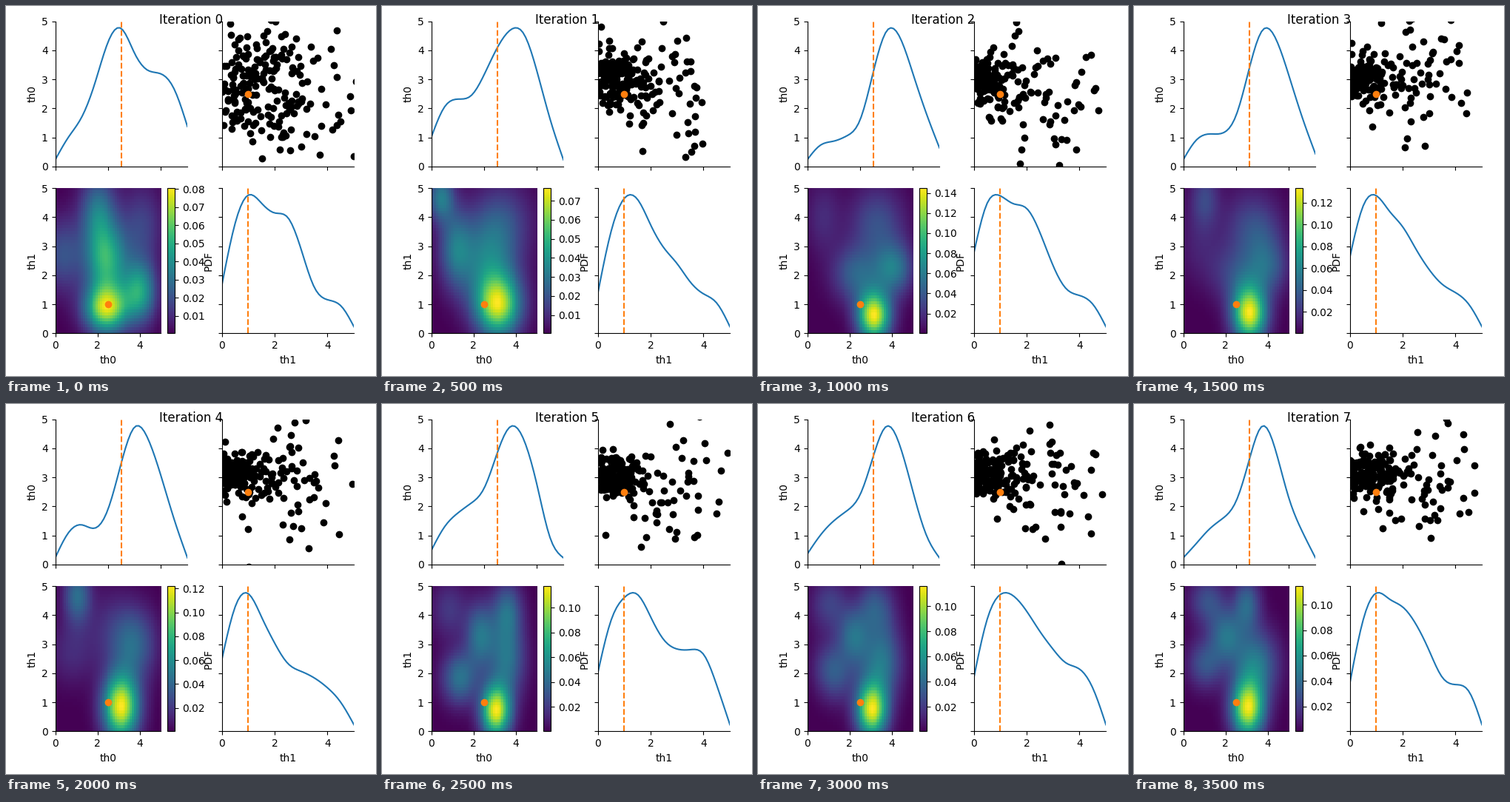
Animation, 500 px wide and 500 px high, one loop 4000 ms. Source, as a matplotlib script:

```python
import numpy as np
import matplotlib.pyplot as plt
from matplotlib.animation import FuncAnimation
from matplotlib.ticker import MultipleLocator

SIZE, DPI = 500, 100
COL, ROW = (66.5, 291.5), (20.6, 246.1)   # left and top edges of the panels
W, H = 178.7, 196.2
TRUTH = (2.5, 1.0)                        # th0, th1


def step(top, pdf0, pdf1, blobs, groups):
    """pdf0, pdf1: relative density at 0, 0.5 ... 5
    blobs: x, y, spread x, spread y, weight of the joint density
    groups: count, th1, th0, spread th1, spread th0 of the samples"""
    return dict(top=top, pdf0=np.array(pdf0), pdf1=np.array(pdf1),
                blobs=np.array(blobs), groups=np.array(groups))


def between(a, b):
    """A step halfway between two others."""
    mid = {k: (a[k] + b[k]) / 2 for k in ("top", "pdf0", "pdf1")}
    mid["blobs"] = np.vstack([a["blobs"], b["blobs"]])
    mid["groups"] = np.vstack([a["groups"], b["groups"]])
    mid["groups"][:, 0] /= 2
    return mid


first = step(
    .0804,
    [0, .17, .32, .575, .885, .985, .80, .672, .645, .53, .25],
    [.31, .78, 1, .94, .865, .83, .59, .30, .205, .16, 0],
    [(2.4, .8, .72, .6, .85), (4, 1.4, .55, .75, .55),
     (2.4, 2.5, .7, .9, .6), (2, 4.2, .6, .9, .38),
     (4.1, 3.7, .7, 1, .2), (.3, 2.7, .7, .9, .25)],
    [(75, .8, 2.4, .55, .7), (45, 2.25, 2.2, .6, .8),
     (48, 1.6, 4, 1, .65), (45, 3.4, 2, 1, 1.5)])

second = step(
    .0766,
    [.17, .40, .46, .485, .645, .85, .985, .955, .67, .305, 0],
    [.25, .72, .975, .97, .775, .60, .48, .34, .25, .18, 0],
    [(3.15, .9, .75, .75, .85), (2.7, 2.5, 1, 1.1, .4),
     (.4, 4.7, .45, .6, .4), (1.1, 2.9, .55, .95, .34),
     (3.4, 4, 1, .9, .18)],
    [(125, .65, 3.1, .55, .6), (40, 1.7, 2.95, .7, .8),
     (45, 2.9, 2.2, .9, 1.4)])

third = step(
    .1448,
    [0, .11, .14, .18, .30, .66, .965, .92, .645, .35, .09],
    [.55, .925, .985, .925, .89, .71, .46, .285, .235, .17, 0],
    [(3.15, .55, .55, .6, .95), (4.1, 2.2, .65, .65, .38),
     (2.3, 2, .8, .7, .3), (3.3, 3.8, .9, .9, .24),
     (.7, 4, .6, .9, .12)],
    [(110, .4, 3.05, .37, .36), (55, 1.4, 3, .65, .75),
     (42, 2.8, 2.2, 1, 1.3)])

fifth = step(
    .122,
    [0, .19, .25, .225, .37, .72, .99, .905, .62, .29, 0],
    [.49, .89, .995, .82, .62, .465, .405, .355, .28, .17, 0],
    [(3.1, .8, .6, .8, .97), (3.7, 3, .75, .9, .33),
     (1, 4.7, .45, .7, .35), (.7, 2.7, .8, .8, .12),
     (2.5, 3.6, .8, 1, .1)],
    [(115, .48, 3.05, .36, .34), (45, 1.25, 3.2, .5, .6),
     (46, 2.9, 3, .85, 1.2)])

sixth = step(
    .1175,
    [.055, .235, .34, .415, .53, .80, 1, .90, .555, .15, 0],
    [.39, .79, .965, .99, .82, .645, .575, .57, .535, .30, 0],
    [(3.05, .65, .5, .65, .92), (3.6, 2.5, .6, .95, .36),
     (2.3, 3.3, .5, .8, .36), (1.3, 1.8, .6, .65, .36),
     (3.6, 4.2, .5, .7, .3), (.8, 4.2, .6, .7, .16)],
    [(110, .55, 3.03, .4, .34), (42, 1.3, 2.97, .55, .57),
     (46, 2.9, 2.6, 1, 1.2)])

eighth = step(
    .1146,
    [0, .11, .22, .30, .43, .745, 1, .81, .45, .20, 0],
    [.31, .79, 1, .955, .895, .765, .565, .36, .305, .255, 0],
    [(3.05, .72, .55, .7, .9), (3.4, 2.3, .75, .85, .4),
     (3, 4.4, .45, .65, .32), (2, 3.3, .55, .65, .33),
     (1, 2.3, .6, .6, .26), (1.1, 4.5, .6, .6, .24)],
    [(105, .7, 3.17, .5, .43), (45, 1.5, 3.1, .6, .6),
     (46, 3.2, 2.8, 1, 1.1)])

steps = [first, second, third, between(third, fifth),
         fifth, sixth, between(sixth, eighth), eighth]

grid = np.linspace(0, 5, 50)
knots = np.linspace(0, 5, 11)


def spline(v):
    """Natural cubic spline through the knots, scaled to fill the panel."""
    n, h = len(v), knots[1]
    system, rhs = np.eye(n), np.zeros(n)
    for i in range(1, n - 1):
        system[i, i - 1:i + 2] = 1, 4, 1
        rhs[i] = 6 * (v[i - 1] - 2 * v[i] + v[i + 1]) / h ** 2
    m = np.linalg.solve(system, rhs)
    i = np.minimum((grid / h).astype(int), n - 2)
    b = grid / h - i
    a = 1 - b
    y = (a * v[i] + b * v[i + 1]
         + ((a ** 3 - a) * m[i] + (b ** 3 - b) * m[i + 1]) * h ** 2 / 6)
    y = (y - y.min()) / (y.max() - y.min())
    return 5 * (y + .05) / 1.1


def joint(blobs, top):
    x, y = np.meshgrid(grid, grid)
    z = sum(weight * np.exp(-(((x - cx) / sx) ** 2 + ((y - cy) / sy) ** 2) / 2)
            for cx, cy, sx, sy, weight in blobs)
    return z * top / z.max()


def samples(groups, seed):
    rng = np.random.default_rng(seed)
    points = np.vstack([rng.normal(g[1:3], g[3:], (int(g[0]), 2))
                        for g in groups])
    points[:, 0] = np.abs(points[:, 0])
    return points


fig = plt.figure(figsize=(SIZE / DPI, SIZE / DPI), dpi=DPI)


def box(left, top, width):
    return fig.add_axes([left / SIZE, 1 - (top + H) / SIZE,
                         width / SIZE, H / SIZE])


def panel(col, row, width=W, **labels):
    ax = box(COL[col], ROW[row], width)
    ax.set(xlim=(0, 5), ylim=(0, 5), xticks=[0, 2, 4], yticks=range(6),
           **labels)
    ax.spines[["top", "right"]].set_visible(False)
    ax.tick_params(labelleft=col == 0, labelbottom=row == 1)
    return ax


ax0 = panel(0, 0, ylabel="th0")
ax_dots = panel(1, 0)
ax_map = panel(0, 1, .8 * W, xlabel="th0", ylabel="th1")
ax1 = panel(1, 1, xlabel="th1", ylabel="PDF")

line0, = ax0.plot(grid, grid, "C0")
line1, = ax1.plot(grid, grid, "C0")
ax0.axvline(TRUTH[0], color="C1", ls="--")
ax1.axvline(TRUTH[1], color="C1", ls="--")
cloud = ax_dots.scatter([], [], color="k")
ax_dots.scatter(TRUTH[1], TRUTH[0], color="C1", zorder=3)
image = ax_map.imshow(np.zeros((50, 50)), extent=(0, 5, 0, 5),
                      origin="lower", aspect="auto", interpolation="nearest")
ax_map.scatter(*TRUTH, color="C1", zorder=3)
bar = fig.colorbar(image, cax=box(COL[0] + .85 * W, ROW[1], H / 20))
title = fig.suptitle("Iteration 0")


def draw(i):
    s = steps[i]
    line0.set_ydata(spline(s["pdf0"]))
    line1.set_ydata(spline(s["pdf1"]))
    cloud.set_offsets(samples(s["groups"], i))
    image.set_data(joint(s["blobs"], s["top"]))
    image.set_clim(.0004, s["top"])
    bar.locator = MultipleLocator(.01 if s["top"] < .1 else .02)
    bar.update_ticks()
    title.set_text(f"Iteration {i}")


anim = FuncAnimation(fig, draw, frames=len(steps), interval=500,
                     repeat=True, repeat_delay=0, blit=False)
plt.show()
```
